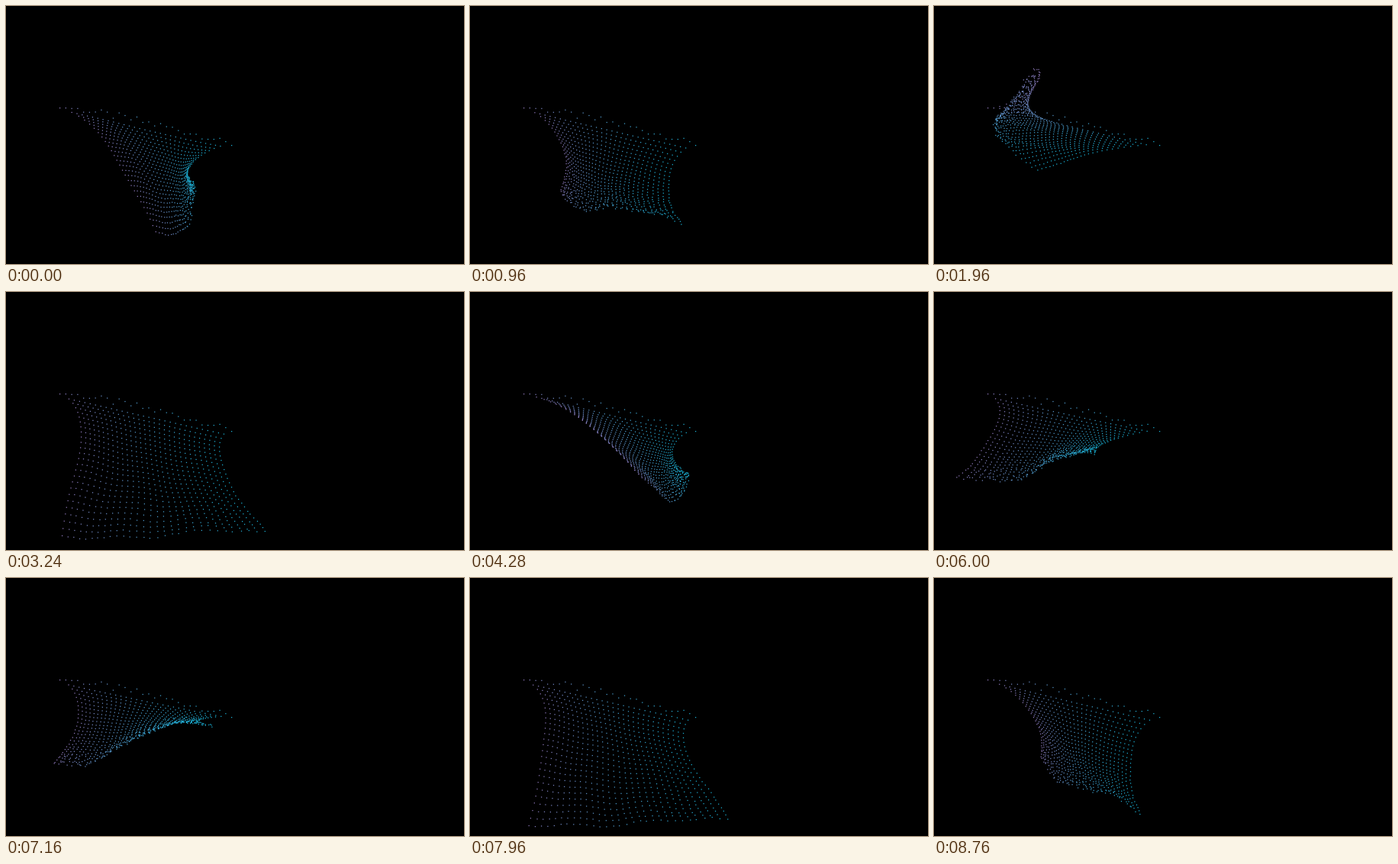
Recreate the animation shown at these times as an HTML page with a canvas. Size 600x338 px, loop 8.8 s.

```html
<!DOCTYPE html>
<html lang="en">
<head>
<meta charset="utf-8">
<title>Cloth of points</title>
<style>
  html, body { margin: 0; width: 100%; height: 100%; overflow: hidden; background: #000; }
  canvas { display: block; width: 600px; height: 338px; }
</style>
</head>
<body>
<canvas id="stage" width="600" height="338"></canvas>
<script>
const ctx = document.getElementById("stage").getContext("2d");
const LOOP = 8800, FRAME = 40, COLS = 30, ROWS = 26, LENGTH = 185;

// The hem is a curve through three points: left, middle, right.
const gathered = [[195, 297], [238, 284], [247, 230]];
const flipped = [[130, 83], [78, 155], [137, 212]];
const open = [[72, 320], [195, 319], [337, 313]];
const swept = [[222, 236], [268, 272], [288, 238]];
const blown = [[30, 240], [135, 232], [212, 211]];
const curled = [[62, 243], [155, 218], [268, 190]];
const draped = [[142, 237], [192, 274], [268, 306]];

const lean = (left, right) => open.map(([x, y], i) => [x + left + (right - left) * i / 2, y]);
const leanRight = lean(50, 0), leanLeft = lean(-69, -119);

const keys = [
  [0, gathered], [450, leanRight], [1960, flipped], [3240, open], [3720, leanRight],
  [4280, swept], [5450, leanLeft], [6000, blown], [6650, flipped], [7160, curled],
  [7900, open], [8250, leanRight], [8760, draped]
];

const mix = (a, b, s) => a + (b - a) * s;

function random(n) {
  const r = Math.sin(n * 12.9898) * 43758.5453;
  return r - Math.floor(r);
}

// Smooth spline through the hem poses.
function hemAt(t) {
  let k = 0;
  while (k < keys.length - 2 && t >= keys[k + 1][0]) k++;
  const [t0, a] = keys[k], [t1, b] = keys[k + 1];
  const [tp, p] = keys[Math.max(0, k - 1)], [tn, n] = keys[Math.min(keys.length - 1, k + 2)];
  const span = t1 - t0, s = Math.min(1, (t - t0) / span), s2 = s * s, s3 = s2 * s;
  return a.map((point, i) => point.map((c, d) => {
    const end = b[i][d];
    const m0 = 0.7 * span * (end - p[i][d]) / (t1 - tp);
    const m1 = 0.7 * span * (n[i][d] - c) / (tn - t0);
    return mix(c, end, 3 * s2 - 2 * s3) + (s3 - 2 * s2 + s) * m0 + (s3 - s2) * m1;
  }));
}

function hemPoint([left, mid, right], u) {
  const along = d => (2 * u - 1) * (u - 1) * left[d] + 4 * u * (1 - u) * mid[d] + u * (2 * u - 1) * right[d];
  return [along(0), along(1)];
}

function place(hem, i, j, t) {
  const u = i / (COLS - 1), v = j / (ROWS - 1);
  const topX = mix(70, 295, u), topY = mix(134, 180, u);
  if (j === 0) return [topX, mix(133, 182, u) - 11 * random(i + 3) * Math.sin(Math.PI * u) ** 0.4];

  const [hemX, hemY] = hemPoint(hem, u);
  const slack = Math.max(0, 1 - Math.hypot(hemX - topX, hemY - topY) / LENGTH);
  // Taut cloth stretches towards the hem; slack cloth bunches up there.
  const w = mix(v * (0.72 + 0.28 * v), Math.sin(1.9 * v) / Math.sin(1.9), slack);
  const gather = 27 * (1 - 2 * u) * Math.sin(Math.PI * v ** 0.6);
  const fold = 22 * slack * v * v * Math.sin(2 * Math.PI * u);
  const crumple = (1 + 7 * slack) * v * v;
  return [
    mix(topX, hemX, w) + gather + 2 * v * Math.sin(9 * v - 5 * u + t / 310) + crumple * (random(i * 31 + j) - 0.5),
    mix(topY, hemY, w) + fold + 2 * v * Math.sin(17 * u + 5 * v - t / 270) + crumple * (random(j * 47 + i + 9) - 0.5)
  ];
}

function colour(u) {
  const s = u ** 0.75;
  return `rgb(${mix(142, 26, s)} ${mix(120, 176, s)} ${mix(186, 212, s)})`;
}

function draw(t) {
  const hem = hemAt(t);
  ctx.fillStyle = "#000";
  ctx.fillRect(0, 0, 600, 338);
  for (let i = 0; i < COLS; i++) {
    ctx.fillStyle = colour(i / (COLS - 1));
    for (let j = 0; j < ROWS; j++) {
      const [x, y] = place(hem, i, j, t);
      ctx.fillRect(x, y, 1.25, 1.25);
    }
  }
}

const start = performance.now();
function tick() {
  const t = (performance.now() - start) % LOOP;
  draw(Math.floor(t / FRAME) * FRAME);
  requestAnimationFrame(tick);
}
tick();
</script>
</body>
</html>
```
